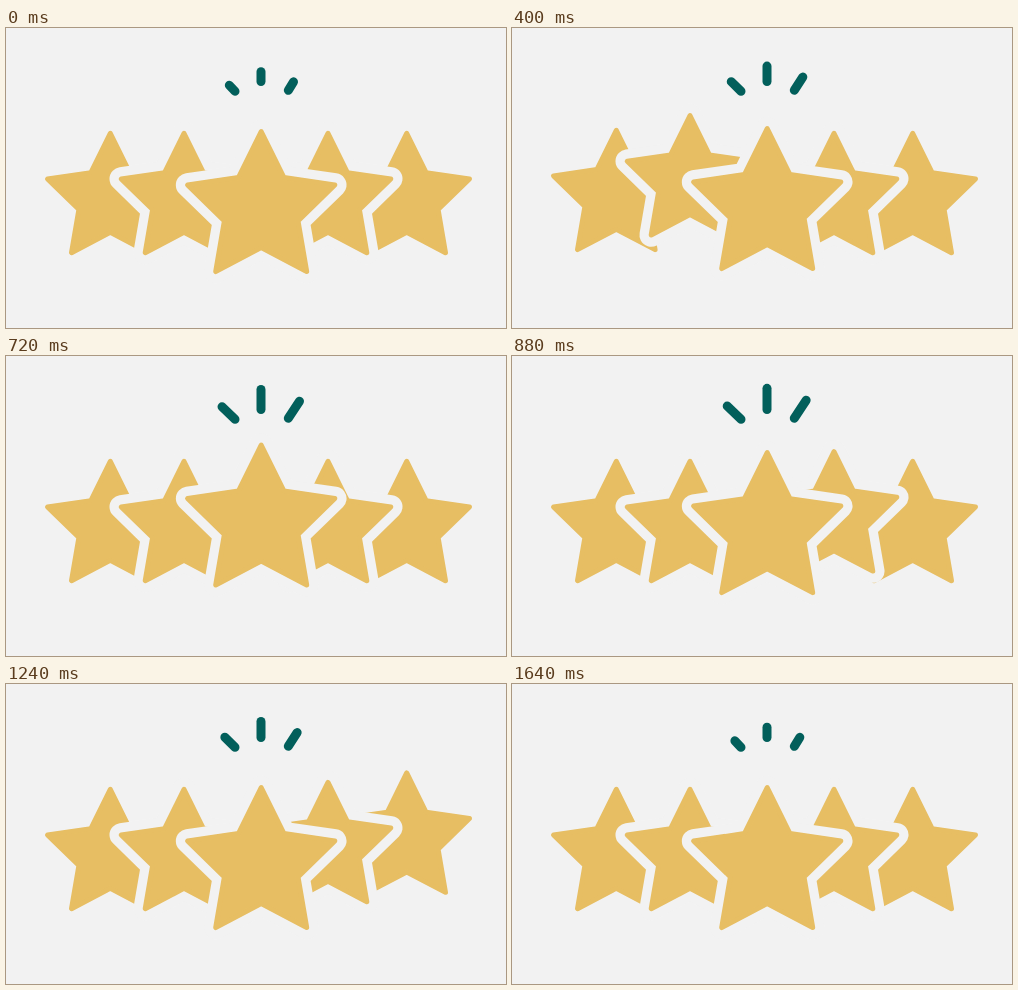
An HTML page that plays this animation: 500 by 300 pixels, repeating every 1.68 s.

```html
<!DOCTYPE html>
<html lang="en">
<head>
<meta charset="utf-8">
<title>Five stars</title>
<style>
  html, body { margin: 0; width: 100%; height: 100%; overflow: hidden; background: #f2f2f2; }
  svg { display: block; width: 100vw; height: 100vh; }
  .star { fill: #e7be63; stroke: #e7be63; stroke-width: 5; stroke-linejoin: round; }
  .gap { fill: #f2f2f2; stroke: #f2f2f2; stroke-width: 23.5; stroke-linejoin: round; }
  .ray { stroke: #025f5b; stroke-width: 9; stroke-linecap: round; }
</style>
</head>
<body>
<svg id="stage" viewBox="0 0 500 300"></svg>
<script>
const LOOP = 1680, STEP = 40;
const stage = document.getElementById('stage');

// Back to front; each star hops once, from start for dur ms.
const stars = [
  { x: 104.3, y: 171.3, r: 66, start: 30, dur: 425, lift: 19.5 },
  { x: 400.7, y: 171.3, r: 66, start: 1040, dur: 480, lift: 17.5 },
  { x: 178, y: 171.3, r: 66, start: 207, dur: 480, lift: 19.5 },
  { x: 322, y: 171.3, r: 66, start: 718, dur: 655, lift: 19.5 },
  { x: 255.2, y: 180.9, r: 77.4, start: 285, dur: 780, lift: 15 }
];

// Fixed base, resting outer end, and how far that end travels.
const rays = [
  { base: [229, 63.3], end: [223.3, 57.2], move: [-8.5, -7.5] },
  { base: [255, 53.5], end: [255, 43.8], move: [0, -12] },
  { base: [282.3, 62.3], end: [287.5, 53.8], move: [7, -10] }
];

function add(parent, tag, attrs) {
  const el = document.createElementNS('http://www.w3.org/2000/svg', tag);
  for (const k in attrs) el.setAttribute(k, attrs[k]);
  return parent.appendChild(el);
}

function starPoints(r) {
  return Array.from({ length: 10 }, (_, i) => {
    const a = i * Math.PI / 5, d = i % 2 ? r * 0.5 : r;
    return (d * Math.sin(a)).toFixed(2) + ',' + (-d * Math.cos(a)).toFixed(2);
  }).join(' ');
}

stars.forEach((s, i) => {
  const points = starPoints(s.r);
  s.el = add(stage, 'g', {});
  if (i > 1) add(s.el, 'polygon', { points, class: 'gap' });
  add(s.el, 'polygon', { points, class: 'star' });
});

rays.forEach(r => {
  r.el = add(stage, 'line', { x1: r.base[0], y1: r.base[1], class: 'ray' });
});

function hop(t, s) {
  const p = (t - s.start) / s.dur;
  return p > 0 && p < 1 ? s.lift * Math.sin(Math.PI * p) ** 2 : 0;
}

function draw(t) {
  for (const s of stars) {
    s.el.setAttribute('transform', `translate(${s.x} ${s.y - hop(t, s)})`);
  }
  const grow = 1 - Math.abs(2 * t / LOOP - 1);
  for (const r of rays) {
    r.el.setAttribute('x2', r.end[0] + r.move[0] * grow);
    r.el.setAttribute('y2', r.end[1] + r.move[1] * grow);
  }
}

const began = performance.now();
function tick() {
  const t = (performance.now() - began) % LOOP;
  draw(Math.floor(t / STEP) * STEP);
  requestAnimationFrame(tick);
}
tick();
</script>
</body>
</html>
```
